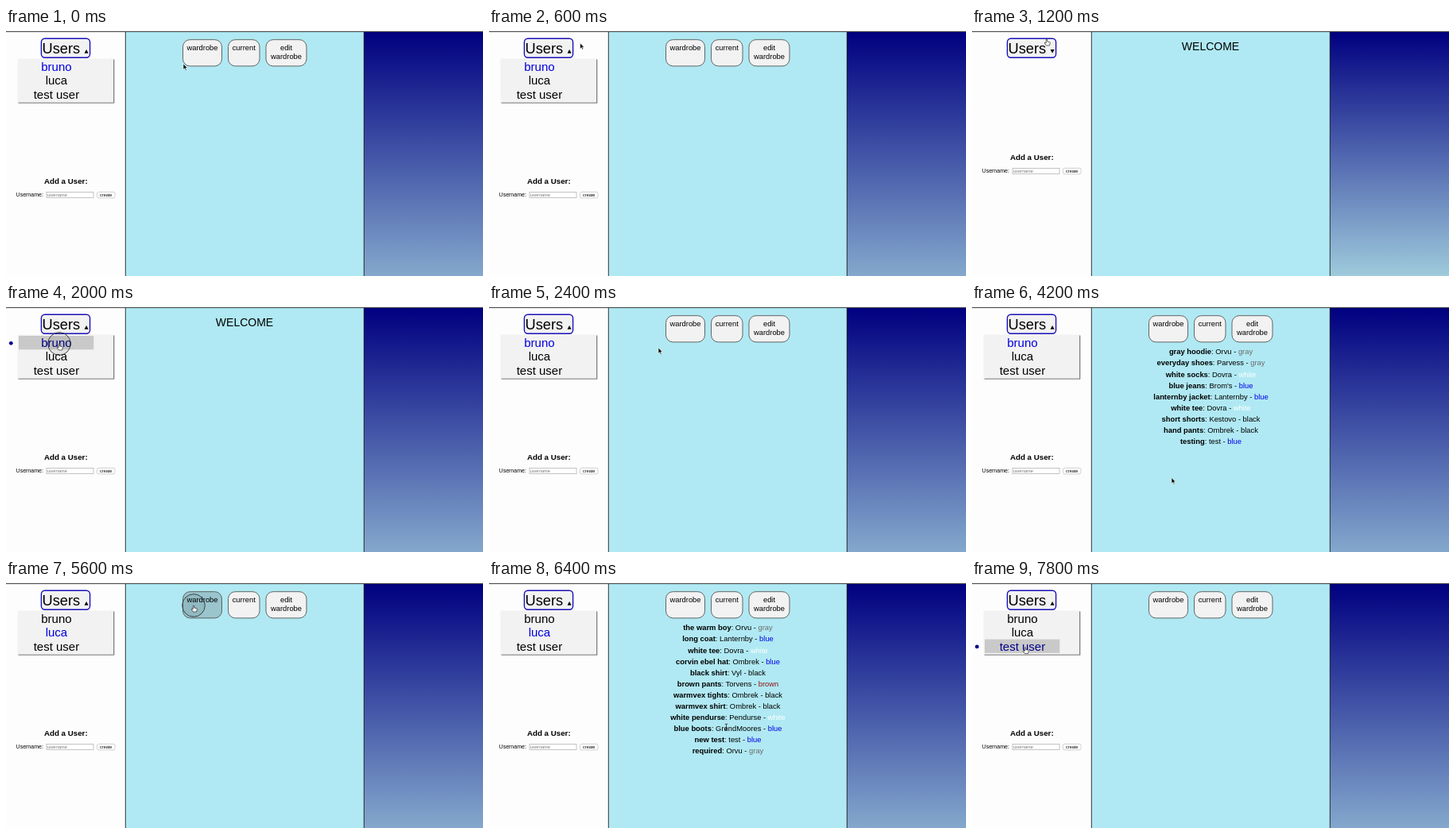
An HTML page that plays this animation: 600x312 px, repeating every 8 s.

```html
<!DOCTYPE html>
<html lang="en">
<head>
<meta charset="utf-8">
<title>Wardrobe</title>
<style>
html, body { margin: 0; width: 100%; height: 100%; overflow: hidden; background: #fff; }
svg { display: block; width: 100vw; height: 100vh; font-family: "Liberation Sans", Arial, sans-serif; }
</style>
</head>
<body>
<svg viewBox="0 0 600 312">
  <defs>
    <linearGradient id="sky" gradientUnits="userSpaceOnUse" x1="0" y1="5" x2="0" y2="415">
      <stop offset="0" stop-color="#000080"/>
      <stop offset="1" stop-color="#b0e0e6"/>
    </linearGradient>
  </defs>
  <rect y="5" width="150" height="307" fill="#fdfdfd"/>
  <rect x="150" y="5" width="300" height="307" fill="#b0e9f3"/>
  <rect x="450" y="5" width="150" height="307" fill="url(#sky)"/>
  <path d="M0 4.6H600M150.3 5V312M450.3 5V312" fill="none" stroke="#222" stroke-width=".9"/>
  <g id="view"></g>
</svg>
<script>
const LOOP = 8000, STEP = 200, ROW = 17.3, LINE = 14.09;
const view = document.getElementById('view');
const sky = document.getElementById('sky');

const users = ['bruno', 'luca', 'test user'];
const closets = [
  ['gray hoodie|Orvu|gray', 'everyday shoes|Parvess|gray', 'white socks|Dovra|white',
   "blue jeans|Brom's|blue", 'lanternby jacket|Lanternby|blue', 'white tee|Dovra|white',
   'short shorts|Kestovo|black', 'hand pants|Ombrek|black', 'testing|test|blue'],
  ['the warm boy|Orvu|gray', 'long coat|Lanternby|blue', 'white tee|Dovra|white',
   'corvin ebel hat|Ombrek|blue', 'black shirt|Vyl|black', 'brown pants|Torvens|brown',
   'warmvex tights|Ombrek|black', 'warmvex shirt|Ombrek|black', 'white pendurse|Pendurse|white',
   'blue boots|GrendMoores|blue', 'new test|test|blue', 'required|Orvu|gray']
];
const inks = { gray: '#6c6c6c', white: '#fff', blue: '#0000e6', black: '#000', brown: '#8f1414' };

let edge = 222.5;
const buttons = [['wardrobe', 49], ['current', 39.5], ['edit wardrobe', 51]].map(([label, w]) => {
  const button = { x: edge, w, lines: label.split(' ') };
  edge += w + 8;
  return button;
});

// The pointer glides to each spot; a spot with a "then" is clicked and changes the page.
const menuSpot = [94, 14], wardrobeSpot = [236, 32];
const rowSpot = i => [67, 50 + ROW * i];
const script = [
  { at: 0, to: [223, 45] },
  { at: 1000, to: menuSpot, then: { open: false, user: -1 } },
  { at: 1400, to: menuSpot, then: { open: true } },
  { at: 2000, to: rowSpot(0), then: { user: 0 } },
  { at: 2400, to: [213, 55] },
  { at: 3000, to: wardrobeSpot, then: { listed: true } },
  { at: 4200, to: [251, 218.5] },
  { at: 5000, to: rowSpot(1), then: { user: 1, listed: false } },
  { at: 5600, to: wardrobeSpot, then: { listed: true } },
  { at: 6400, to: [298.5, 185] },
  { at: 7600, to: rowSpot(2), then: { user: 2, listed: false } }
];

const stateAt = t => Object.assign({ open: true, user: 0, listed: false },
  ...script.filter(s => s.at < t).map(s => s.then));

function pointerAt(t) {
  const from = script.findLast(s => s.at <= t);
  const next = script.find(s => s.at > t) || from;
  const k = next === from ? 0 : (t - from.at) / (next.at - from.at);
  const ease = k * (2 - k);
  const [x, y] = from.to.map((v, i) => v + (next.to[i] - v) * ease);
  return { x, y, click: from.at === t && from.then };
}

const text = (x, y, size, body, fill = '#000', extra = 'text-anchor="middle"') =>
  `<text x="${x}" y="${y}" font-size="${size}" fill="${fill}" ${extra}>${body}</text>`;
const box = (x, y, w, h, fill, extra = '') =>
  `<rect x="${x}" y="${y}" width="${w}" height="${h}" fill="${fill}" ${extra}/>`;
const inside = (p, x, y, w, h) => p.x >= x && p.x <= x + w && p.y >= y && p.y <= y + h;

function menu(user, hover) {
  const rows = users.map((name, i) => {
    const top = 40 + ROW * i, on = i === hover;
    const mark = on ? box(16, top, 94.3, ROW, '#c9c9c9') +
      `<circle cx="6.3" cy="${top + 9.3}" r="2.4" fill="#00008b"/>` : '';
    return mark + text(63.4, top + 13.9, 15, name, on ? '#00008b' : i === user ? '#0000e0' : '#000');
  });
  return box(15.5, 39.5, 120.8, 55.2, '#777') + box(14.5, 38.5, 120.6, 55.2, '#f2f2f2') + rows.join('');
}

function form(y) {
  return text(75.3, y, 9.75, 'Add a User:', '#000', 'text-anchor="middle" font-weight="bold"') +
    text(12.6, y + 15.9, 7, 'Username:', '#000', '') +
    box(51, y + 10.2, 59, 7, '#fff', 'stroke="#b5b5b5" stroke-width=".8"') +
    text(52, y + 15.5, 5.6, 'username', '#777', '') +
    box(114.5, y + 10, 22.5, 7.5, '#fff', 'rx="2" stroke="#c4c4c4" stroke-width=".8"') +
    text(125.7, y + 15.5, 5.5, 'create');
}

function sidebar({ open, user }, hover) {
  return (open ? menu(user, hover) : '') +
    box(44.4, 13.2, 61.2, 24, '#f2f2f2', 'rx="4.5" stroke="#1a10b8" stroke-width="1.4"') +
    text(45.5, 32, 18.3, 'Users', '#000', '') +
    `<path d="${open ? 'M98.6 31.8h5l-2.5-4.8z' : 'M98.6 27h5l-2.5 4.8z'}"/>` +
    form(open ? 196.3 : 166.3);
}

function main(user, rows, hover) {
  if (user < 0) return text(300, 27.7, 14, 'WELCOME');
  const tabs = buttons.map(({ x, w, lines }, i) =>
    box(x, 14.7, w, 33.2, i === hover ? '#9ac5ce' : '#f2f2f2', 'rx="9" stroke="#555" stroke-width=".9"') +
    lines.map((line, n) => text(x + w / 2, 28.3 + 10.7 * n, 9.4, line)).join(''));
  const items = rows.map((row, i) => {
    const [item, brand, color] = row.split('|');
    return text(300.5, 63.4 + LINE * i, 9.4,
      `<tspan font-weight="bold">${item}</tspan>: ${brand} - <tspan fill="${inks[color]}">${color}</tspan>`);
  });
  return tabs.concat(items).join('');
}

const shapes = {
  arrow: '<path d="M0 0V7.2L1.7 5.7 2.9 8.4 4.1 7.9 2.9 5.3H5.1Z" fill="#000" stroke="#fff" stroke-width=".6"/>',
  hand: '<path d="M-.8.5Q0-.4.7.5V3L3.6 3.7Q4.5 4 4.3 5L3.5 8H-.6L-2.8 5Q-2.6 4-1.6 4.5L-.8 5.2Z" ' +
    'fill="#fff" stroke="#222" stroke-width=".7"/>',
  beam: '<path d="M-1.8-4Q0-4 0-3Q0-4 1.8-4M0-3V3M-1.8 4Q0 4 0 3Q0 4 1.8 4M-1 1H1" ' +
    'fill="none" stroke="#222" stroke-width=".8"/>'
};

function pointer({ x, y, click }, shape) {
  const ring = click
    ? '<circle r="14.3" fill-opacity=".06" stroke="#333" stroke-width=".9"/>' : '';
  return `<g transform="translate(${x} ${y})">${ring}${shapes[shape]}</g>`;
}

function draw(t) {
  const { open, user, listed } = stateAt(t), p = pointerAt(t);
  const rows = listed ? closets[user] : [];
  const item = open ? users.findIndex((_, i) => inside(p, 16, 40 + ROW * i, 94, ROW)) : -1;
  const button = user < 0 ? -1 : buttons.findIndex(b => inside(p, b.x + 3, 17, b.w - 6, 28));
  const overMenu = inside(p, 44, 13, 62, 24.5);
  const overText = inside(p, 245, 55, 110, LINE * rows.length);
  const shape = item >= 0 || button >= 0 || overMenu ? 'hand' : overText ? 'beam' : 'arrow';
  sky.setAttribute('y2', open ? 415 : 345);
  view.innerHTML = sidebar({ open, user }, item) + main(user, rows, button) + pointer(p, shape);
}

let last = -1;
function tick() {
  const t = Math.floor(performance.now() % LOOP / STEP) * STEP;
  if (t !== last) draw(last = t);
  requestAnimationFrame(tick);
}
tick();
</script>
</body>
</html>
```
